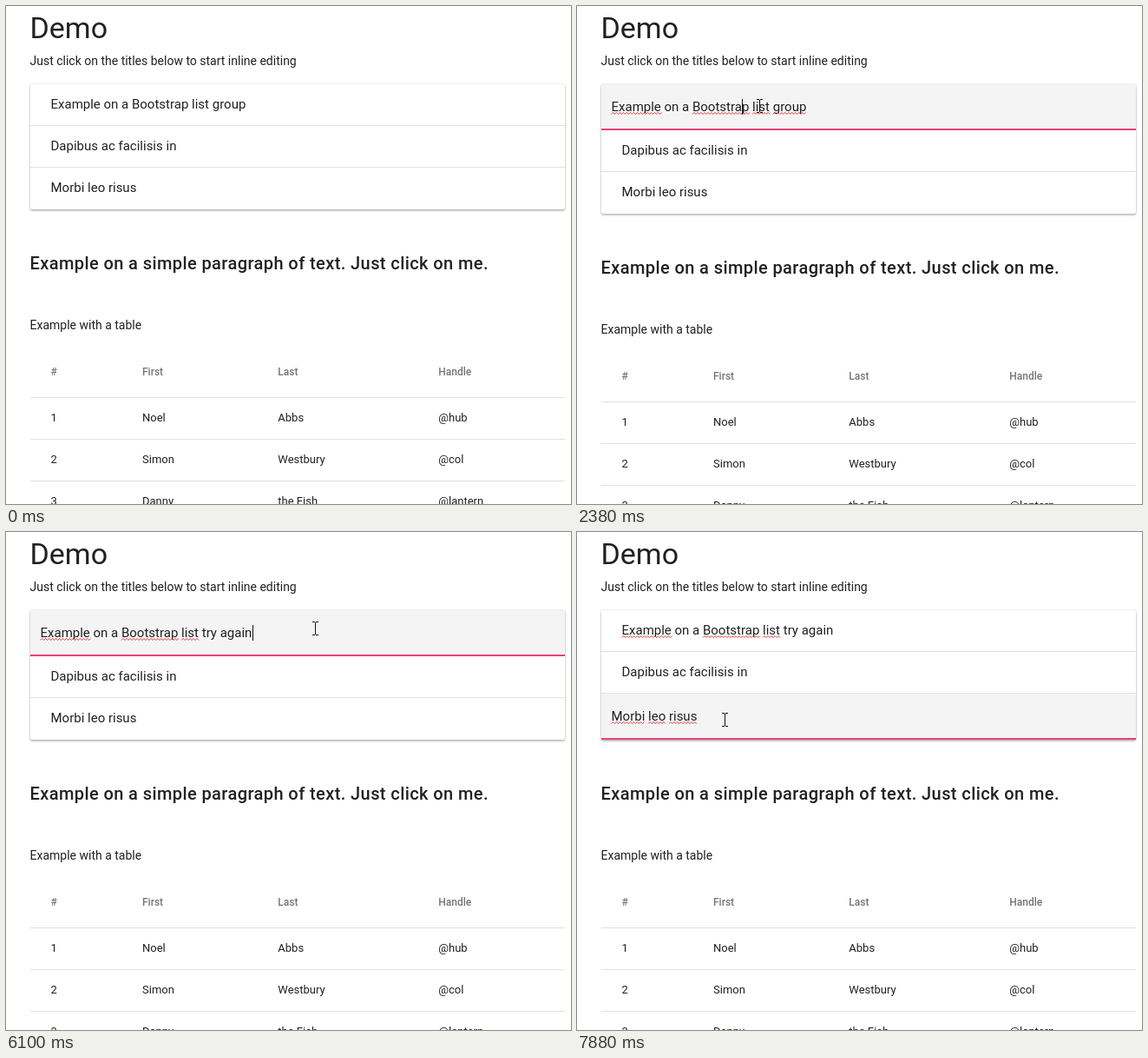
Write an HTML page that moves like this. It is 651 px wide and 573 px high and loops after 8000 ms.

```html
<!DOCTYPE html>
<html lang="en">
<head>
<meta charset="utf-8">
<title>Inline editing demo</title>
<style>
  html, body { margin: 0; width: 100%; height: 100%; overflow: hidden; background: #fff; }
  #panel {
    position: absolute; left: 28px; top: 90px; width: 616px; height: 144px;
    border-radius: 2px; background: #fff;
    box-shadow: 0 0 2px rgba(0,0,0,.14), 0 2px 2px rgba(0,0,0,.12), 0 1px 3px rgba(0,0,0,.2);
  }
  svg { position: absolute; left: 0; top: 0; display: block; }
  text { font: 14px Roboto, "Liberation Sans", sans-serif; fill: #212121; white-space: pre; }
  .h1 { font-size: 34px; }
  .h2 { font-size: 20px; font-weight: 500; letter-spacing: .02em; }
  .row text { font-size: 15px; }
  .th { font-size: 12px; font-weight: 500; fill: #757575; }
  .td { font-size: 13px; }
  .rule { fill: #e1e1e1; }
  .bg { fill: #f4f4f4; }
  .bar { fill: #ec407a; }
  .wave { fill: none; stroke: #e0383e; stroke-width: 1; }
  #sel { fill: #4a8df8; }
  #beam { fill: none; stroke: #111; stroke-width: 1; }
  #arrow { fill: #fff; stroke: #000; stroke-width: 1; }
</style>
</head>
<body>
<div id="panel"></div>
<svg id="stage" width="651" height="573">
  <text class="h1" x="27.5" y="37">Demo</text>
  <text x="27.5" y="68">Just click on the titles below to start inline editing</text>
  <g id="rows"></g>
  <g id="below">
    <text class="h2" x="27.5" y="303">Example on a simple paragraph of text. Just click on me.</text>
    <text x="27.5" y="372">Example with a table</text>
    <g id="table"></g>
  </g>
  <rect id="caret" width="1" height="18" fill="#111"/>
  <path id="beam" d="M-3.5-7.5h3m1 0h3M0-7V7M-3.5 7.5h3m1 0h3"/>
  <path id="arrow" d="M.5.5V16.5L4.2 13 6.6 18.5 9 17.5 6.6 12.2H11.8Z"/>
</svg>
<script>
const LOOP = 8000;
const $ = id => document.getElementById(id);
const show = (el, on) => el.setAttribute('visibility', on ? 'visible' : 'hidden');
const move = (el, x, y) => el.setAttribute('transform', `translate(${x} ${y})`);
const set = (el, attrs) => { for (const k in attrs) el.setAttribute(k, attrs[k]); };

// Table
const cols = [51.5, 157, 313.3, 498.3];
const cells = (cls, y, words) =>
  words.map((w, i) => `<text class="${cls}" x="${cols[i]}" y="${y}">${w}</text>`).join('');
const people = [
  ['1', 'Noel', 'Abbs', '@hub'],
  ['2', 'Simon', 'Westbury', '@col'],
  ['3', 'Danny', 'the Fish', '@lantern']
];
$('table').innerHTML = cells('th', 425, ['#', 'First', 'Last', 'Handle']) +
  people.map((p, i) => `<rect class="rule" x="28" y="${450 + 48 * i}" width="616" height="1"/>` +
    cells('td', 478 + 48 * i, p)).join('');

// List rows
const HEAD = 'Example on a Bootstrap list ';
const titles = [HEAD, 'Dapibus ac facilisis in', 'Morbi leo risus'];
$('rows').innerHTML = titles.map((s, i) => `<g class="row">
  <rect class="bg" x="28" width="616"/>
  <rect class="rule" x="28" width="616" height="1" visibility="${i < 2 ? 'visible' : 'hidden'}"/>
  <rect class="bar" x="28" width="616" height="2"/>
  <g class="label">${i ? '' : '<rect id="sel" y="-14" height="18"/>'}
    <text><tspan>${s}</tspan><tspan class="tail"></tspan></text><path class="wave"/></g></g>`).join('');
const rows = [...document.querySelectorAll('.row')].map(g => {
  const q = s => g.querySelector(s);
  return { g, bg: q('.bg'), rule: q('.rule'), bar: q('.bar'), label: q('.label'),
    text: q('text'), tail: q('.tail'), wave: q('.wave') };
});

// Timeline
const FOCUS_A = 1860, SELECT = 2820, FOCUS_B = 7300;
const TYPED = 'try again';
const keys = [4990, 5130, 5210, 5350, 5510, 5650, 5710, 5870, 6100];

// start, end, steps, from x/y, to x/y, bow
const moves = [
  [370, 1170, 12, 470, 531, 206, 118, 0],
  [1250, 1250, 1, 206, 118, 206, 116, 0],
  [2320, 2680, 6, 206, 116, 258, 116, -5],
  [3210, 3350, 3, 258, 116, 356, 111, -7],
  [6780, 7220, 7, 356, 111, 185, 207, 0],
  [7600, 7880, 5, 185, 207, 170, 216, 0]
];

function pointer(t) {
  const m = moves.filter(v => t >= v[0]).pop();
  if (!m) return null;
  const [a, b, n, x0, y0, x1, y1, bow] = m;
  const k = t >= b ? n : 1 + Math.floor((t - a) / (b - a) * (n - 1));
  const u = k / n, e = u * u * (3 - 2 * u);
  return [Math.round(x0 + (x1 - x0) * e),
          Math.round(y0 + (y1 - y0) * e + bow * Math.sin(Math.PI * e))];
}

function grow(t, start) {
  const d = t - start;
  return d < 75 ? 0 : d < 150 ? .82 : d < 220 ? .97 : 1;
}

const blink = (t, start) => t >= start && Math.floor((t - start) / 535) % 2 === 0;

function waves(text, words) {
  const s = text.textContent;
  let d = '';
  for (const w of words) {
    const i = s.indexOf(w);
    if (i < 0) continue;
    const x0 = i ? text.getSubStringLength(0, i) : 0;
    const n = Math.round(text.getSubStringLength(i, w.length) / 2);
    d += `M${x0} 3.5`;
    for (let j = 0; j < n; j++) d += j % 2 ? 'l2 2' : 'l2-2';
  }
  return d;
}

function render(t) {
  const first = t >= FOCUS_A && t < FOCUS_B, last = t >= FOCUS_B;
  const pa = first ? grow(t, FOCUS_A) : 0, pb = grow(t, FOCUS_B);
  const open = [pa, 0, pb];
  const tint = [last ? 1 - pb : pa, 0, pb];
  const active = [first, false, last];

  // Text of the first row
  const count = keys.filter(k => t >= k).length;
  const selected = t >= SELECT && t < keys[0];
  const tail = count ? TYPED.slice(0, count) : 'group';
  if (rows[0].tail.textContent !== tail) rows[0].tail.textContent = tail;
  rows[0].tail.style.fill = selected ? '#fff' : '';
  show($('sel'), selected);
  if (selected) set($('sel'), { x: 186.5, width: 38 });

  let top = 90;
  rows.forEach((r, i) => {
    const h = 48 + Math.round(5 * open[i]);
    r.x = 51.5 - 12 * open[i];
    r.y = top + 28 + Math.floor(3 * open[i] + .04);
    set(r.bg, { y: top, height: h, opacity: tint[i] });
    r.rule.setAttribute('y', top + h - 1);
    r.bar.setAttribute('y', top + h - 2);
    show(r.bar, active[i]);
    move(r.label, r.x, r.y);
    top += h;
  });
  $('panel').style.height = top - 90 + 'px';
  move($('below'), 0, top - 234);

  // Spelling marks
  const marks = ['Example', 'Bootstrap', 'list'];
  if (!selected) marks.push('group');
  rows[0].wave.setAttribute('d', t >= 1935 ? waves(rows[0].text, marks) : '');
  rows[2].wave.setAttribute('d', t >= 7600 ? waves(rows[2].text, ['Morbi', 'leo', 'risus']) : '');

  // Caret
  const row = last ? rows[2] : rows[0];
  const clicked = t < SELECT;
  const from = last ? FOCUS_B : clicked ? FOCUS_A : keys[Math.max(0, count - 1)];
  const at = first && clicked ? row.text.getSubStringLength(0, 21) : row.text.getComputedTextLength();
  show($('caret'), !selected && blink(t, from));
  set($('caret'), { x: Math.ceil(row.x + at), y: row.y - 14 });

  // Mouse pointer
  const p = pointer(t), inside = p && p[1] < 236;
  show($('beam'), inside);
  show($('arrow'), p && !inside);
  if (p) {
    move($('beam'), p[0] + .5, p[1]);
    move($('arrow'), p[0], p[1]);
  }
}

function tick(now) {
  render(now % LOOP);
  requestAnimationFrame(tick);
}
render(0);
requestAnimationFrame(tick);
</script>
</body>
</html>
```
